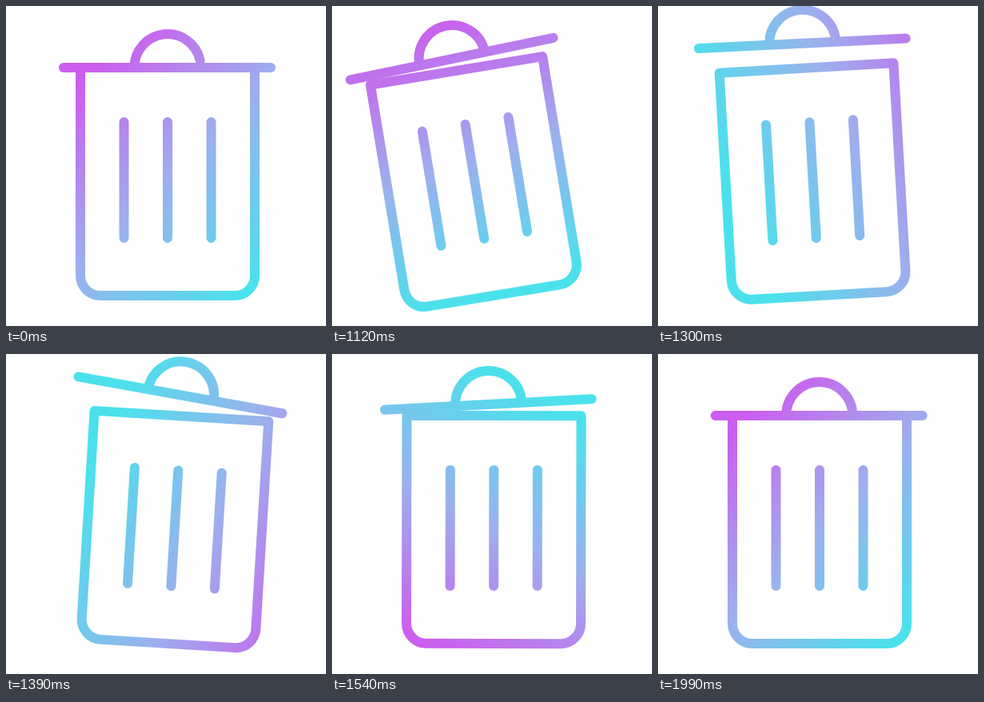
An HTML page for the animation above (2020 ms loop, 400x400 px).

```html
<!DOCTYPE html>
<html lang="en">
<head>
<meta charset="utf-8">
<title>Trash can</title>
<style>
  html, body { margin: 0; height: 100%; overflow: hidden; background: #fefefe; }
  svg { display: block; width: 100%; height: 100%; }
</style>
</head>
<body>
<svg viewBox="0 0 400 400">
  <linearGradient id="tint" gradientUnits="userSpaceOnUse">
    <stop offset="0" stop-color="#cb5eee"/>
    <stop offset=".5" stop-color="#9cb0ed"/>
    <stop offset="1" stop-color="#4be1ec"/>
  </linearGradient>
  <g id="can" fill="none" stroke="url(#tint)" stroke-width="12" stroke-linecap="round" stroke-linejoin="round">
    <path d="M93 77H311V337a25 25 0 0 1-25 25H118a25 25 0 0 1-25-25Z"/>
    <path d="M147.5 145V290M202 145V290M256.5 145V290"/>
    <g id="lid">
      <path d="M72 77H331"/>
      <path id="handle" stroke-linecap="butt"/>
    </g>
  </g>
</svg>
<script>
const LOOP = 2020, START = 1030, STEP = 30;
const [tint, can, lid, handle] = ['tint', 'can', 'lid', 'handle'].map(id => document.getElementById(id));

// time, can angle, lid angle, lid x, lid y, gradient angle, gradient shift
const keys = [
  [1000, 0, 0, 0, 0, 45, 0],
  [1030, -3.36, -.5, -1.3, -4.3, 48, 0],
  [1150, -10, -3, -3, -19, 96, .12],
  [1240, -7.9, -5.46, -3.1, -28.7, 135, .22],
  [1310, -2.5, 1.5, -3, -31, 166, .19],
  [1390, 3.5, 6.7, -2.6, -26, 203, .12],
  [1430, 4.8, 5, -3.5, -23, 228, .08],
  [1540, .1, -3.1, -6.75, -14, 297, 0],
  [1720, 0, 2.86, -2, -3.5, 377, -.09],
  [1990, 0, 0, -.3, 0, 405, 0]
];
const last = keys.length - 1;

const slope = (i, c) => (keys[i + 1][c] - keys[i][c]) / (keys[i + 1][0] - keys[i][0]);

// Tangent that flattens at peaks, so curves never overshoot a key
function tangent(i, c) {
  if (i === 0) return slope(0, c);
  if (i === last) return 0;
  const a = slope(i - 1, c), b = slope(i, c);
  return a * b > 0 ? 2 * a * b / (a + b) : 0;
}

function value(t, c) {
  if (t <= keys[0][0]) return keys[0][c];
  if (t >= keys[last][0]) return keys[last][c];
  const i = keys.findIndex(k => k[0] > t) - 1;
  const span = keys[i + 1][0] - keys[i][0], u = (t - keys[i][0]) / span;
  const ease = u * u * (3 - 2 * u);
  return keys[i][c] + (keys[i + 1][c] - keys[i][c]) * ease
    + span * u * (1 - u) * ((1 - u) * tangent(i, c) - u * tangent(i + 1, c));
}

function setTint(angle, shift) {
  const a = angle * Math.PI / 180;
  [-.5, .5].forEach((end, i) => {
    const d = (end - shift) * 330;
    tint.setAttribute('x' + (i + 1), 202 + d * Math.cos(a));
    tint.setAttribute('y' + (i + 1), 219 + d * Math.sin(a));
  });
}

function draw(now) {
  const time = now % LOOP, resting = time < START;
  const t = resting ? 0 : START + STEP * Math.floor((time - START) / STEP);
  const [canTurn, lidTurn, x, y, angle, shift] = [1, 2, 3, 4, 5, 6].map(c => value(t, c));
  can.setAttribute('transform', `rotate(${canTurn} 202 362)`);
  lid.setAttribute('transform', `translate(${x} ${y}) rotate(${lidTurn} 202 77)`);
  // At rest the handle stops just short of the lid with a round end
  handle.setAttribute('d', 'M160.5 76.5A41.5 41.5 0 0 1 ' + (resting ? '242.6 68' : '243.5 76.5'));
  handle.setAttribute('stroke-linecap', resting ? 'round' : 'butt');
  setTint(angle, shift);
}

const began = performance.now();
function tick() {
  draw(performance.now() - began);
  requestAnimationFrame(tick);
}
tick();
</script>
</body>
</html>
```
